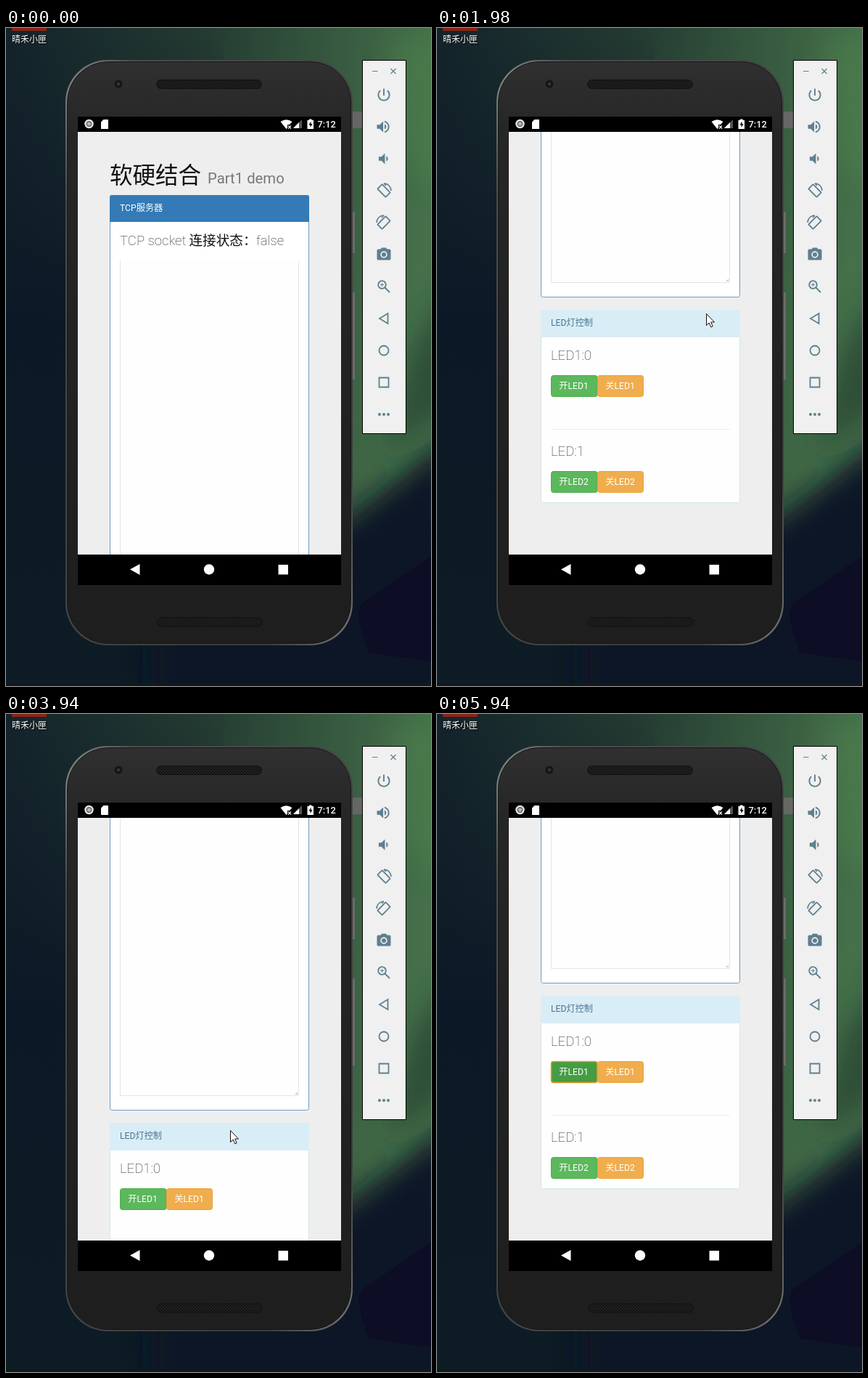
An HTML page that plays this animation: 586 px wide and 906 px high, repeating every 6.47 s.

```html
<!DOCTYPE html>
<html lang="zh">
<head>
<meta charset="utf-8">
<style>
  html, body { margin: 0; width: 100%; height: 100%; overflow: hidden; background: #0d1a26; }
  svg { display: block; width: 586px; height: 906px; font-family: Roboto, "Noto Sans CJK SC", "Noto Sans CJK", sans-serif; }
  .thin { font-size: 18.6px; font-weight: 100; fill: #222; }
  .label { font-size: 12.2px; }
  .line { fill: none; stroke: #5f7f90; stroke-width: 1.8; }
</style>
</head>
<body>
<svg viewBox="0 0 586 906">
  <defs>
    <linearGradient id="wall" x2="1" y2=".12">
      <stop stop-color="#14232b"/><stop offset=".45" stop-color="#233a31"/><stop offset="1" stop-color="#45704a"/>
    </linearGradient>
    <linearGradient id="night" x2="0" y2="1">
      <stop stop-color="#0c1826" stop-opacity="0"/><stop offset=".45" stop-color="#0c1826"/><stop offset="1" stop-color="#0d1c25"/>
    </linearGradient>
    <linearGradient id="shell" x2="0" y2="1">
      <stop stop-color="#303030"/><stop offset=".12" stop-color="#262626"/><stop offset="1" stop-color="#1e1e1e"/>
    </linearGradient>
    <linearGradient id="rim" x2="1" y2="1">
      <stop stop-color="#8a8d8e"/><stop offset=".12" stop-color="#4a4c4d"/><stop offset=".85" stop-color="#3c3c3c"/><stop offset="1" stop-color="#777"/>
    </linearGradient>
    <pattern id="mesh" width="4" height="4" patternUnits="userSpaceOnUse">
      <rect width="4" height="4" fill="#141414"/><circle cx="1" cy="1" r=".8" fill="#303030"/><circle cx="3" cy="3" r=".8" fill="#303030"/>
    </pattern>
    <filter id="soft" x="-50%" y="-50%" width="200%" height="200%"><feGaussianBlur stdDeviation="18"/></filter>
    <clipPath id="view"><path d="M99 143H462V725H99Z"/></clipPath>
  </defs>

  <!-- wallpaper -->
  <path fill="url(#wall)" d="M0 0H586V906H0Z"/>
  <path fill="url(#night)" d="M0 0H300V906H0Z"/>
  <g filter="url(#soft)">
    <path fill="#0c1527" d="M200 906V820L470 675 620 560V950H200Z"/>
    <path fill="#090b25" d="M480 800 640 690V880L500 860Z"/>
    <path fill="#4d7f4e" opacity=".6" d="M530 20 620 0V230L550 180Z"/>
    <path fill="#26402f" opacity=".7" d="M560 440 620 350V520L520 590Z"/>
  </g>
  <path fill="#15191c" opacity=".8" d="M0 902H586V906H0Z"/>
  <rect x="8" y="-44" width="48" height="48" fill="#8c2415"/>
  <text x="8" y="20" font-size="12" fill="#fff" style="text-shadow:1px 1px 1px #000">晴禾小匣</text>

  <!-- phone -->
  <path fill="#656765" d="M470 115H491V138H470Z"/>
  <path fill="#6b6b6b" d="M476 253H481V310H476ZM476 364H481V484H476Z"/>
  <rect x="82" y="44" width="396" height="806" rx="58" fill="url(#rim)"/>
  <rect x="84.5" y="46.5" width="391" height="801" rx="56" fill="url(#shell)" stroke="#181818"/>
  <circle cx="155" cy="77" r="5.5" fill="#161616"/><circle cx="155" cy="77" r="2.2" fill="#343638"/>
  <rect x="207.5" y="71.5" width="145" height="12" rx="6" fill="url(#mesh)" stroke="#111"/>
  <rect x="208.500" y="812" width="145" height="12" rx="6" fill="url(#mesh)" stroke="#111"/>
  <path d="M99 122H462V767H99Z"/>
  <path fill="#eee" d="M99 143H462V725H99Z"/>
  <g clip-path="url(#view)"><g id="page"></g></g>

  <!-- status and navigation bars -->
  <circle cx="114.500" cy="132" r="5.2" fill="#777" stroke="#eee" stroke-width="2"/><circle cx="114.500" cy="132" r="2.300" fill="#bbb"/>
  <g fill="#fff">
    <path d="M134.500 126H141V139H131V129.500Z"/>
    <path d="M378.500 129Q386.500 123.500 394.500 129L391 133H388V137.500L386.500 139Z"/>
    <path d="M389 134.500l4 4m0-4l-4 4" stroke="#fff" stroke-width="1.100"/>
    <path fill="#555" d="M408 126V138H396Z"/><path d="M404 130V138H396Z"/>
    <path d="M418 125.500h3.500v1.300h2.500V139h-8.500V126.800H418Z"/>
    <path fill="#000" d="M420.500 128.500l-3 5h2v3.500l3-5h-2Z"/>
    <text x="429.500" y="137" font-size="12.800" font-weight="500">7:12</text>
    <path d="M171 745.500 184.500 738V753Z"/><circle cx="280" cy="745.500" r="7.200"/><path d="M375.500 739H389V752.500H375.500Z"/>
  </g>

  <!-- emulator tools -->
  <path d="M491.500 44.500H551.500V558.500H491.500Z" fill="#f0f0f0" stroke="#000"/>
  <path d="M505 59.500h7.500M530.500 56l7 7m0-7l-7 7" class="line" style="stroke-width:1.200"/>
  <g id="tools" fill="#5f7f90"></g>

  <path id="cursor" d="M.5.5V16.500L4.200 13 6.700 18.800 9.200 17.700 6.700 12H11.500Z" fill="#fff" stroke="#111"/>
</svg>
<script>
const LOOP = 6470, STEP = 77.3, START = 70, LEAVE = 5940, PRESS = 5470, MAX = 560;
const $ = id => document.getElementById(id);

const text = (x, y, s, attrs) => `<text x="${x}" y="${y}" ${attrs}>${s}</text>`;
const box = (x, y, w, h, fill, stroke, more = '') =>
  `<rect x="${x + .5}" y="${y + .5}" width="${w - 1}" height="${h - 1}" fill="${fill}" stroke="${stroke}" ${more}/>`;
const button = (x, y, w, s, fill, stroke, id = '') =>
  box(x, y, w, 30, fill, stroke, `rx="3" ${id && `id="${id}"`}`) + text(x + 11.3, y + 19, s, 'class="label" fill="#fff"');
const header = (y, h, fill) =>
  `<path fill="${fill}" d="M143 ${y + h}V${y + 3}q0-3 3-3H415q3 0 3 3V${y + h}Z"/>`;
const ledRow = (y, title, n, id) => text(157, y, title, 'class="thin"') +
  button(157, y + 21, 64.500, '开LED' + n, '#5cb85c', '#4cae4c', id) +
  button(221, y + 21, 64, '关LED' + n, '#f0ad4e', '#eea236');

$('page').innerHTML =
  text(143, 214, '软硬结合', 'font-size="31.500" fill="#111"') +
  text(278, 214, 'Part1 demo', 'font-size="20.300" fill="#777"') +
  box(143, 230, 275, 141 + MAX, '#fff', '#6f9cc4', 'rx="3"') + header(230, 37, '#337ab7') +
  text(157, 252, 'TCP服务器', 'class="label" fill="#fff"') +
  text(157, 299, 'TCP socket', 'class="thin"') +
  text(252.500, 299, '连接状态：', 'font-size="18.600" fill="#111"') +
  text(345, 299, 'false', 'class="thin"') +
  `<path d="M157.500 320V${350.5 + MAX}H403.500V320" fill="#fefefe" stroke="#e4e4e4"/>
   <path d="M399 ${349 + MAX}l3-3m-1 3l1-1" stroke="#999" stroke-width=".8"/>
   <g transform="translate(0 ${MAX})">` +
  box(143, 388, 275, 266, '#fefefe', '#d3e6e8', 'rx="3"') + header(388, 38, '#d9edf7') +
  text(157, 410, 'LED灯控制', 'class="label" fill="#4a7590"') +
  ledRow(457, 'LED1:0', 1, 'pressed') +
  '<path d="M157 552.500H404" stroke="#eee"/>' +
  ledRow(589, 'LED:1', 2) + '</g>';

const phone = '<rect x="-4.500" y="-8" width="9" height="16" rx="1" transform="rotate(-45)" class="line"/>' +
  '<path d="M0-10A10 10 0 0 1 10 0M0-10l3 3" class="line" style="stroke-width:1.500"/>';
const glyph = d => `<path transform="translate(-11.400 -11.400) scale(.95)" fill-rule="evenodd" d="${d}"/>`;
const outline = d => `<path class="line" d="${d}"/>`;
$('tools').innerHTML = [
  glyph('M13 3h-2v10h2V3zm4.800 2.200l-1.400 1.400A6.900 6.900 0 0 1 19 12a7 7 0 1 1-11.400-5.400L6.200 5.200A9 9 0 1 0 21 12c0-2.700-1.200-5.200-3.200-6.800z'),
  glyph('M2 9v6h4l5 5V4L6 9zm13.500 3A4.500 4.500 0 0 0 13 8v8a4.500 4.500 0 0 0 2.500-4zM13 3.200v2.100a7 7 0 0 1 0 13.400v2.100a9 9 0 0 0 0-17.600z'),
  glyph('M4.500 9v6h4l5 5V4l-5 5zm13.500 3a4.500 4.500 0 0 0-2.500-4v8a4.500 4.500 0 0 0 2.500-4z'),
  phone,
  `<g transform="scale(-1 1)">${phone}</g>`,
  glyph('M9 2L7.200 4H4a2 2 0 0 0-2 2v12a2 2 0 0 0 2 2h16a2 2 0 0 0 2-2V6a2 2 0 0 0-2-2h-3.200L15 2zm3 15a5 5 0 1 1 0-10 5 5 0 0 1 0 10zm0-1.800a3.200 3.200 0 1 0 0-6.400 3.200 3.200 0 0 0 0 6.400z'),
  '<circle cx="-2.500" cy="-2.500" r="5.300" class="line"/>' + outline('M1.500 1.500L8 8') +
    '<path class="line" style="stroke-width:1" d="M-5-2.500H0M-2.500-5V0"/>',
  outline('M-6 0L5.500-7V7Z'),
  '<circle r="6.500" class="line"/>',
  outline('M-6.500-6.500H6.500V6.500H-6.500Z'),
  [-6, 0, 6].map(x => `<circle cx="${x}" r="2"/>`).join('')
].map((icon, i) => `<g transform="translate(521 ${92 + 44 * i})">${icon}</g>`).join('');

// Keys: time, then values
const scrollKeys = [[766, 0], [997, MAX - 295], [1390, MAX - 95], [1540, MAX - 70], [1850, MAX],
  [2155, MAX], [2760, 90], [2930, 0], [3580, 0], [3935, MAX - 175], [4170, MAX - 8], [4400, MAX]];
const cursorKeys = [[70, 508, 886], [690, 300, 600], [997, 295, 331], [1230, 300, 310], [1540, 345, 600],
  [2002, 371, 393], [2230, 360, 340], [2760, 335, 590], [3316, 325, 611], [3600, 318, 650],
  [3935, 309, 573], [4630, 274, 489], [4940, 274, 489], [5017, 230, 481], [5240, 190, 482],
  [5560, 190, 482], [5870, 444, 876]];

function at(keys, t) {
  const i = keys.findIndex(k => k[0] > t);
  if (i < 1) return (i ? keys[keys.length - 1] : keys[0]).slice(1);
  const a = keys[i - 1], b = keys[i], p = (t - a[0]) / (b[0] - a[0]);
  return a.slice(1).map((v, j) => Math.round(v + (b[j + 1] - v) * p));
}

function draw() {
  const t = performance.now() % LOOP;
  const held = t < START ? 0 : START + Math.floor((t - START) / STEP + .35) * STEP;
  $('page').setAttribute('transform', `translate(0 ${-at(scrollKeys, held)[0]})`);
  $('cursor').setAttribute('transform', `translate(${at(cursorKeys, held)})`);
  $('cursor').setAttribute('visibility', t >= START && t < LEAVE ? 'visible' : 'hidden');
  $('pressed').setAttribute('fill', t >= PRESS ? '#449d44' : '#5cb85c');
  $('pressed').setAttribute('stroke', t >= PRESS ? '#e59a20' : '#4cae4c');
  $('pressed').setAttribute('stroke-width', t >= PRESS ? 1.6 : 1);
  requestAnimationFrame(draw);
}
draw();
</script>
</body>
</html>
```
